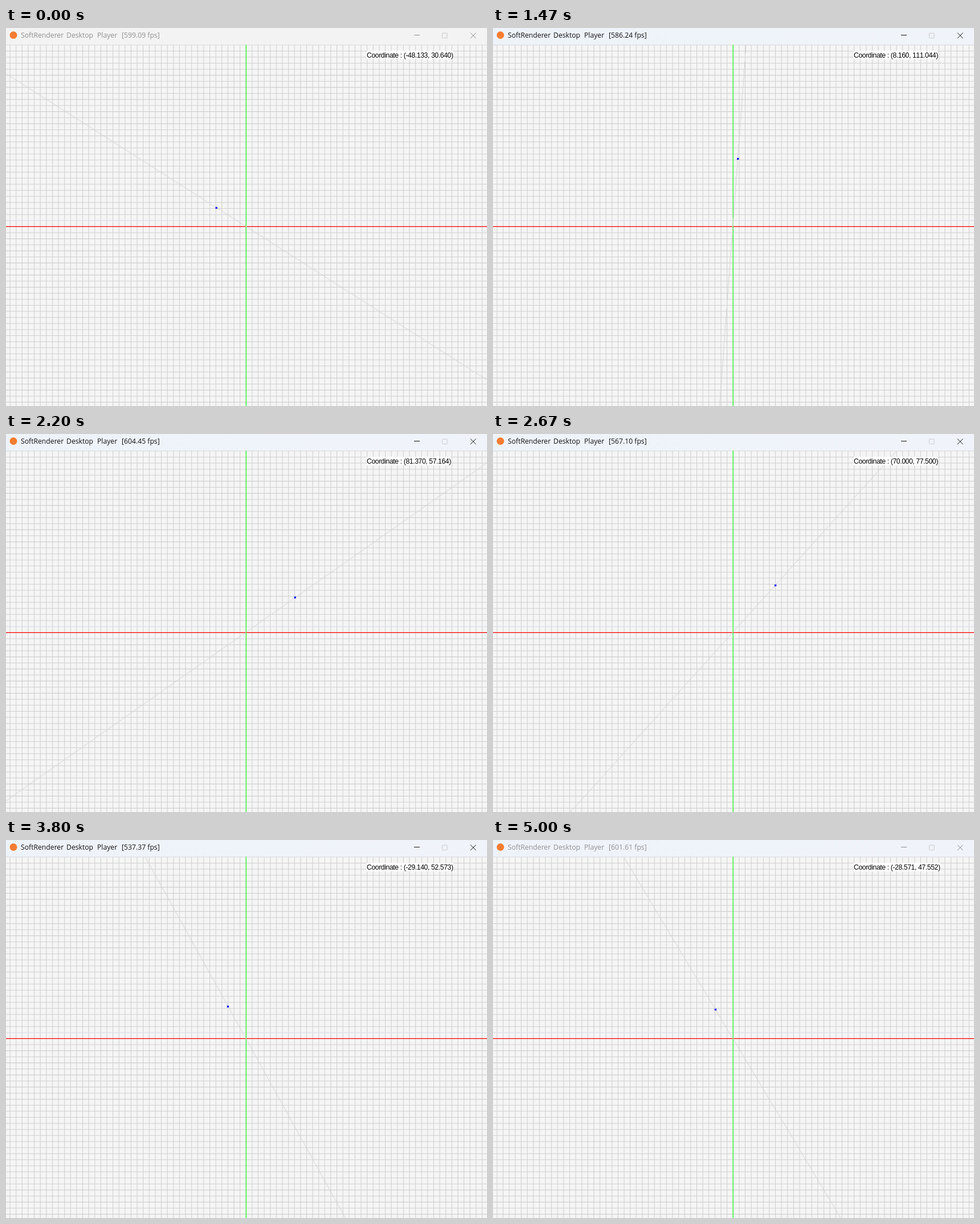
These frames come from a looping animation (844x663 px, 5140 ms). An HTML page:

```html
<!DOCTYPE html>
<html lang="en">
<head>
<meta charset="utf-8">
<title>SoftRenderer Desktop Player</title>
<style>
html, body { margin: 0; width: 100%; height: 100%; overflow: hidden; background: #f5f5f5; }
svg { display: block; width: 100%; height: 100%; }
.bar { font: 12.2px "Open Sans", "Noto Sans", sans-serif; }
.coord { font: 12.2px "Liberation Sans", Arial, sans-serif; letter-spacing: -0.39px; font-kerning: none; }
</style>
</head>
<body>
<svg viewBox="0 0 844 663" preserveAspectRatio="none">
  <rect width="844" height="663" fill="#f5f5f5"/>
  <path id="grid" stroke="#d0d0d0" stroke-width="1.06"/>
  <path id="tint" stroke="#e2e4f4" stroke-width="1.06"/>
  <path id="axisX" stroke="#f00" stroke-width="1.06"/>
  <path id="axisY" stroke="#0f0" stroke-width="1.06"/>
  <path id="line" fill="none" stroke="#d5d5d5" stroke-width="1.06"/>
  <rect id="dot" width="3.2" height="3.2" fill="#00f"/>
  <rect id="plate" x="633" y="40" height="15" fill="#fff"/>
  <text id="coord" class="coord" x="633" y="51.7"></text>
  <linearGradient id="blue"><stop stop-color="#eef3fa"/><stop offset="1" stop-color="#f0f3fa"/></linearGradient>
  <rect id="bar" width="844" height="29.3"/>
  <circle cx="13" cy="12.5" r="6.5" fill="#f57c30"/>
  <g id="title" class="bar">
    <text x="26" y="17.3">SoftRenderer</text>
    <text x="106" y="17.3">Desktop</text>
    <text x="160" y="17.3">Player</text>
    <text id="fps" x="203" y="17.3"></text>
  </g>
  <path id="buttons" fill="none" d="M716 12.5H726M815 8.5L824.6 18.1M824.6 8.5L815 18.1"/>
  <rect x="765.5" y="9" width="8.6" height="8.6" rx="1" fill="none" stroke="#cacaca"/>
</svg>
<script>
const LOOP = 5140, STEP = 200 / 3;           // ms per loop, ms per tick
const OX = 421.25, OY = 348.4, UNIT = 1.062; // centre of the plane, size of one unit
const FOCUS = 9, BLUR = 75;                  // ticks where the window gains and loses focus
const $ = id => document.getElementById(id);
const set = (id, attrs) => { for (const a in attrs) $(id).setAttribute(a, attrs[a]); };
const px = x => (OX + x * UNIT).toFixed(2);
const py = y => (OY - y * UNIT).toFixed(2);

// Turning points of the dragged point: tick, x, y
const drag = [
  [8, -48.133, 30.64], [15, -38.396, 68.441], [22, 8.16, 111.044], [33, 81.37, 57.164],
  [36, 84, 48], [40, 70, 77.5], [47, 37.244, 99.318], [57, -29.14, 52.573],
  [65, -80, 101], [66, -80, 101], [75, -28.571, 47.552]
];
// Frame rate: tick, fps
const speed = [[0, 599.09], [15, 605.03], [20, 586.24], [30, 604.45], [45, 548.79], [55, 537.37], [75, 601.61]];

// Smooth curve through column c of the keys that never overshoots them
function curve(keys, c, k) {
  const last = keys.length - 1;
  if (k <= keys[0][0]) return keys[0][c];
  if (k >= keys[last][0]) return keys[last][c];
  const secant = i => (keys[i + 1][c] - keys[i][c]) / (keys[i + 1][0] - keys[i][0]);
  const slope = i => {
    const a = secant(Math.max(i - 1, 0)), b = secant(Math.min(i, last - 1));
    return a * b > 0 ? 2 * a * b / (a + b) : 0;
  };
  const i = keys.findIndex(key => key[0] > k) - 1;
  const h = keys[i + 1][0] - keys[i][0], u = (k - keys[i][0]) / h, v = 1 - u;
  return keys[i][c] * (1 + 2 * u) * v * v + slope(i) * h * u * v * v +
    keys[i + 1][c] * (1 + 2 * v) * u * u - slope(i + 1) * h * u * u * v;
}

// Stair-stepped line through the centre, one run per row or column
function stairs(x, y) {
  const steep = Math.abs(y) > Math.abs(x);
  const r = steep ? x / y : y / x, reach = steep ? 302 : 400;
  const rows = Math.ceil(reach * Math.abs(r));
  const end = n => Math.max(-reach, Math.min(reach, Math.round(n / r)));
  let d = "";
  for (let n = -rows; n < rows; n++) {
    const a = end(n), b = end(n + 1);
    d += steep ? `M${px(n)} ${py(a + 0.5)}V${py(b + 0.5)}`
               : `M${px(a - 0.5)} ${py(n + 1)}H${px(b - 0.5)}`;
  }
  return d;
}

// Ticks fall on whole hundredths of a second
function tickAt(t) {
  let k = Math.ceil(t / STEP);
  while (k > 0 && t < Math.round(k * STEP / 10) * 10) k--;
  return Math.min(k, BLUR);
}

let shown = -1;
function draw(t) {
  const k = tickAt(t);
  if (k === shown) return;
  shown = k;
  const x = curve(drag, 1, k), y = curve(drag, 2, k);
  const fps = curve(speed, 1, k - k % 5);
  const active = k >= FOCUS && k < BLUR;
  set("line", { d: stairs(x, y) });
  set("dot", { x: px(Math.floor(x) - 1.5), y: py(Math.ceil(y) + 1.5) });
  $("coord").textContent = `Coordinate : (${x.toFixed(3)}, ${y.toFixed(3)})`;
  set("plate", { width: $("coord").getComputedTextLength() });
  $("fps").textContent = `[${fps.toFixed(2)} fps]`;
  set("bar", { fill: k < FOCUS ? "#f3f3f3" : "url(#blue)" });
  set("title", { fill: active ? "#111" : "#909090" });
  set("buttons", { stroke: active ? "#111" : "#8c8c8c" });
}

const row = y => `M0 ${py(y)}H844`, column = x => `M${px(x)} 29V663`;
let grid = "";
for (let n = -400; n <= 400; n += 10) grid += column(n) + row(n);
set("grid", { d: grid });
set("tint", { d: row(10) });
set("axisX", { d: row(0) });
set("axisY", { d: column(0) });

const start = performance.now();
function frame() {
  draw((performance.now() - start) % LOOP);
  requestAnimationFrame(frame);
}
frame();
</script>
</body>
</html>
```
